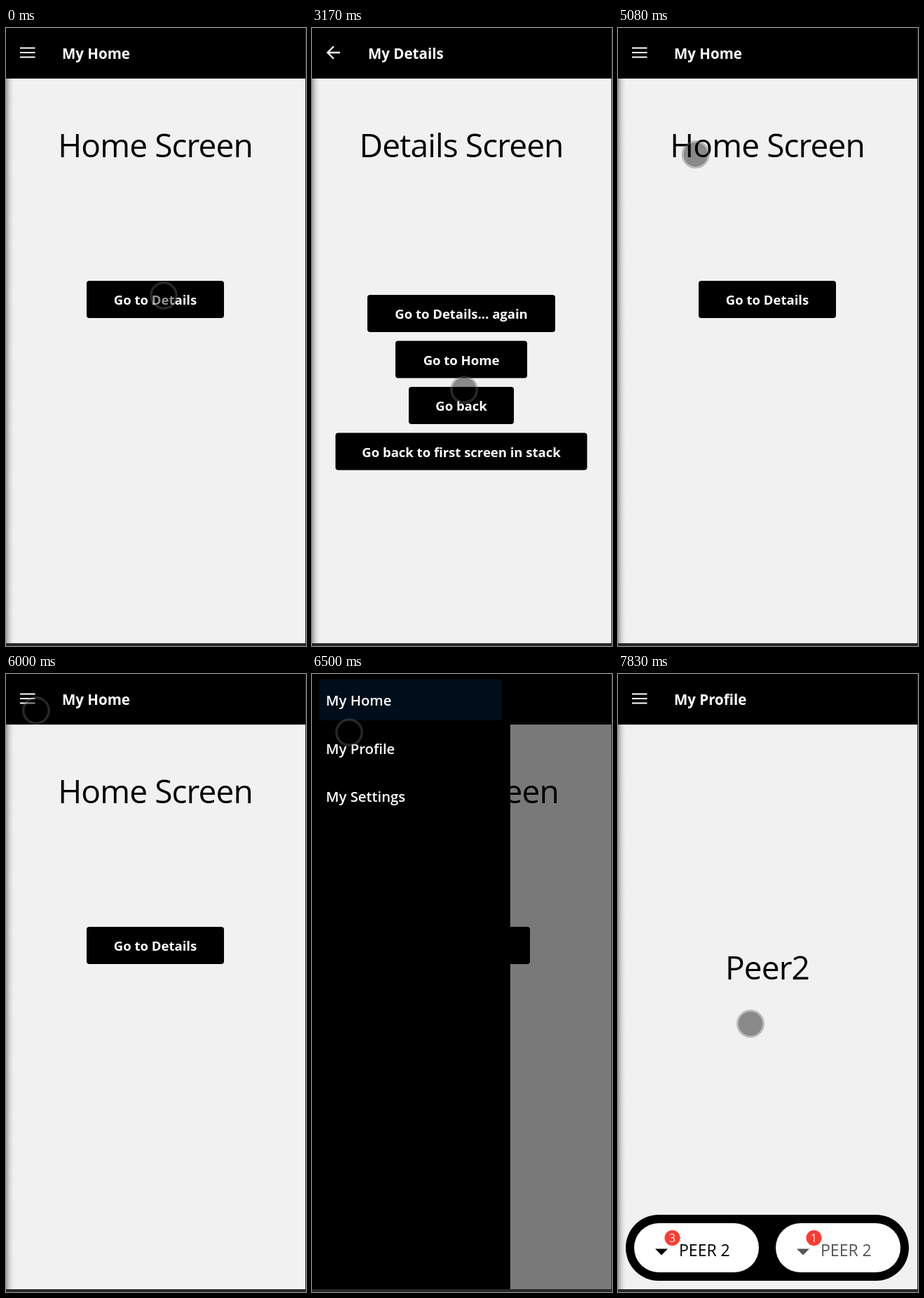
Recreate the animation shown at these times as an HTML page with a canvas. Size 428 by 880 pixels, loop 8000 ms.

```html
<!DOCTYPE html>
<html lang="en">
<head>
<meta charset="utf-8">
<title>Navigation demo</title>
<style>
  html, body { margin: 0; width: 100%; height: 100%; overflow: hidden; background: #28282b; }
  canvas { display: block; width: 428px; height: 880px; }
</style>
</head>
<body>
<canvas id="stage"></canvas>
<script>
const W = 428, H = 880, LOOP = 8000;
const PAGE_W = 427, PAGE_H = 876, BAR_H = 72, DRAWER_W = 284;
const FONT = '"Open Sans", "Noto Sans", sans-serif';
const BG = '#f1f1f1';

const T = { details: 500, home: 4580, flashClose: 4600, open: 6050, profile: 6830 };

// Pointer path: time, x, y
const PATH = [
  [0, 225, 381], [750, 225, 381], [900, 229, 395], [1170, 217, 460],
  [1340, 217, 460], [1420, 217, 471], [1750, 229, 567],
  [2000, 229, 567], [2500, 212, 414],
  [2840, 212, 414], [3170, 217, 515], [3580, 229, 548],
  [3840, 229, 548], [4330, 225, 596],
  [4500, 225, 596], [4580, 222, 477], [4920, 118, 194],
  [5000, 118, 194], [5830, 43, 52],
  [6250, 43, 52], [6500, 53, 83], [6750, 65, 106],
  [7380, 65, 106], [7580, 116, 198], [7750, 193, 440], [7830, 189, 498], [8000, 189, 498]
];

const canvas = document.getElementById('stage');
const ctx = canvas.getContext('2d');
const dpr = window.devicePixelRatio || 1;
canvas.width = W * dpr;
canvas.height = H * dpr;

function box(x, y, w, h, r, fill) {
  ctx.fillStyle = fill;
  ctx.beginPath();
  ctx.roundRect(x, y, w, h, r);
  ctx.fill();
}

function disc(x, y, r, fill) {
  ctx.fillStyle = fill;
  ctx.beginPath();
  ctx.arc(x, y, r, 0, Math.PI * 2);
  ctx.fill();
}

function text(str, x, y, size, { weight = 400, color = '#000', align = 'left', spacing = 0 } = {}) {
  ctx.font = `${weight} ${size}px ${FONT}`;
  ctx.letterSpacing = `${spacing * size}px`;
  ctx.textAlign = align;
  ctx.fillStyle = color;
  ctx.fillText(str, x, y);
}

const heading = (str, y) => text(str, 213, y, 46, { align: 'center', spacing: -0.019 });

function button(label, y, w) {
  box(213 - w / 2, y, w, 53, 4, '#000');
  text(label, 213, y + 34, 18.5, { weight: 700, color: '#fff', align: 'center' });
}

function menuIcon() {
  ctx.fillStyle = '#fff';
  for (const y of [27.5, 34, 40.5]) ctx.fillRect(20, y, 21.5, 2);
}

function backIcon() {
  ctx.strokeStyle = '#fff';
  ctx.lineWidth = 2.3;
  ctx.beginPath();
  ctx.moveTo(40, 35);
  ctx.lineTo(22.5, 35);
  ctx.moveTo(31, 26.2);
  ctx.lineTo(22.3, 35);
  ctx.lineTo(31, 43.8);
  ctx.stroke();
}

function page(title, icon) {
  ctx.fillStyle = BG;
  ctx.fillRect(0, 0, PAGE_W, PAGE_H);
  const shade = ctx.createLinearGradient(0, 0, 11, 0);
  shade.addColorStop(0, 'rgba(0,0,0,.34)');
  shade.addColorStop(0.5, 'rgba(0,0,0,.1)');
  shade.addColorStop(1, 'rgba(0,0,0,0)');
  ctx.fillStyle = shade;
  ctx.fillRect(0, BAR_H, 11, PAGE_H - BAR_H);
  ctx.fillStyle = '#000';
  ctx.fillRect(0, 0, PAGE_W, BAR_H);
  icon();
  text(title, 80, 44, 20.5, { weight: 700, color: '#fff' });
}

function homePage() {
  page('My Home', menuIcon);
  heading('Home Screen', 184);
  button('Go to Details', 360, 196);
}

function detailsPage() {
  page('My Details', backIcon);
  heading('Details Screen', 184);
  button('Go to Details... again', 380, 268);
  button('Go to Home', 445.5, 188);
  button('Go back', 511, 150);
  button('Go back to first screen in stack', 576.5, 359);
}

function tab(x, count, color) {
  box(x, 782, 178, 70, 35, '#fff');
  ctx.fillStyle = color;
  ctx.beginPath();
  ctx.moveTo(x + 30, 818.5);
  ctx.lineTo(x + 48, 818.5);
  ctx.lineTo(x + 39, 827.5);
  ctx.fill();
  disc(x + 54.5, 803, 11, '#ff3b30');
  text(count, x + 54.5, 808.5, 15.5, { color: '#fff', align: 'center' });
  text('PEER 2', x + 64, 829, 23, { color });
}

function profilePage() {
  page('My Profile', menuIcon);
  heading('Peer2', 435);
  box(11, 770, 404, 94, 47, '#000');
  tab(23, '3', '#000');
  tab(225, '1', '#555');
}

function drawer(open, active, dim) {
  if (open < 0.002) return;
  ctx.fillStyle = `rgba(0,0,0,${dim * open})`;
  ctx.fillRect(0, 0, PAGE_W, PAGE_H);
  ctx.save();
  ctx.translate((open - 1) * DRAWER_W, 0);
  ctx.fillStyle = '#000';
  ctx.fillRect(0, 0, DRAWER_W, PAGE_H);
  box(11.5, 7.5 + active * 68.5, 260.5, 58.5, 4, '#000e1b');
  ['My Home', 'My Profile', 'My Settings'].forEach((label, i) =>
    text(label, 21, 45 + i * 68.5, 20.3, { weight: 600, color: '#fff' }));
  ctx.restore();
}

function pointer(t) {
  const i = PATH.findIndex(p => p[0] > t);
  const [t0, x0, y0] = PATH[i - 1], [t1, x1, y1] = PATH[i];
  const k = (t - t0) / (t1 - t0);
  const x = x0 + (x1 - x0) * k, y = y0 + (y1 - y0) * k;
  disc(x, y, 17, 'rgba(0,0,0,.43)');
  ctx.strokeStyle = 'rgba(100,100,100,.4)';
  ctx.lineWidth = 3.5;
  ctx.beginPath();
  ctx.arc(x, y, 18.2, 0, Math.PI * 2);
  ctx.stroke();
}

// Fraction still left of an exponential settle
const left = (t, start, tau) => Math.exp(-Math.max(0, t - start) / tau);

function drawDrawer(t) {
  if (t >= T.profile) drawer(left(t, T.profile, 85), 1, 0.5);
  else if (t >= T.open) drawer(1 - left(t, T.open, 82), 0, 0.5);
  else if (t >= T.home) drawer(left(t, T.flashClose, 55), 0, 0);
}

function draw(t) {
  ctx.setTransform(dpr, 0, 0, dpr, 0, 0);
  ctx.fillStyle = '#28282b';
  ctx.fillRect(0, 0, W, H);
  if (t >= T.profile) profilePage();
  else if (t >= T.details && t < T.home) detailsPage();
  else homePage();
  drawDrawer(t);
  pointer(t);
}

const start = performance.now();
function tick() {
  draw((performance.now() - start) % LOOP);
  requestAnimationFrame(tick);
}
tick();
</script>
</body>
</html>
```
